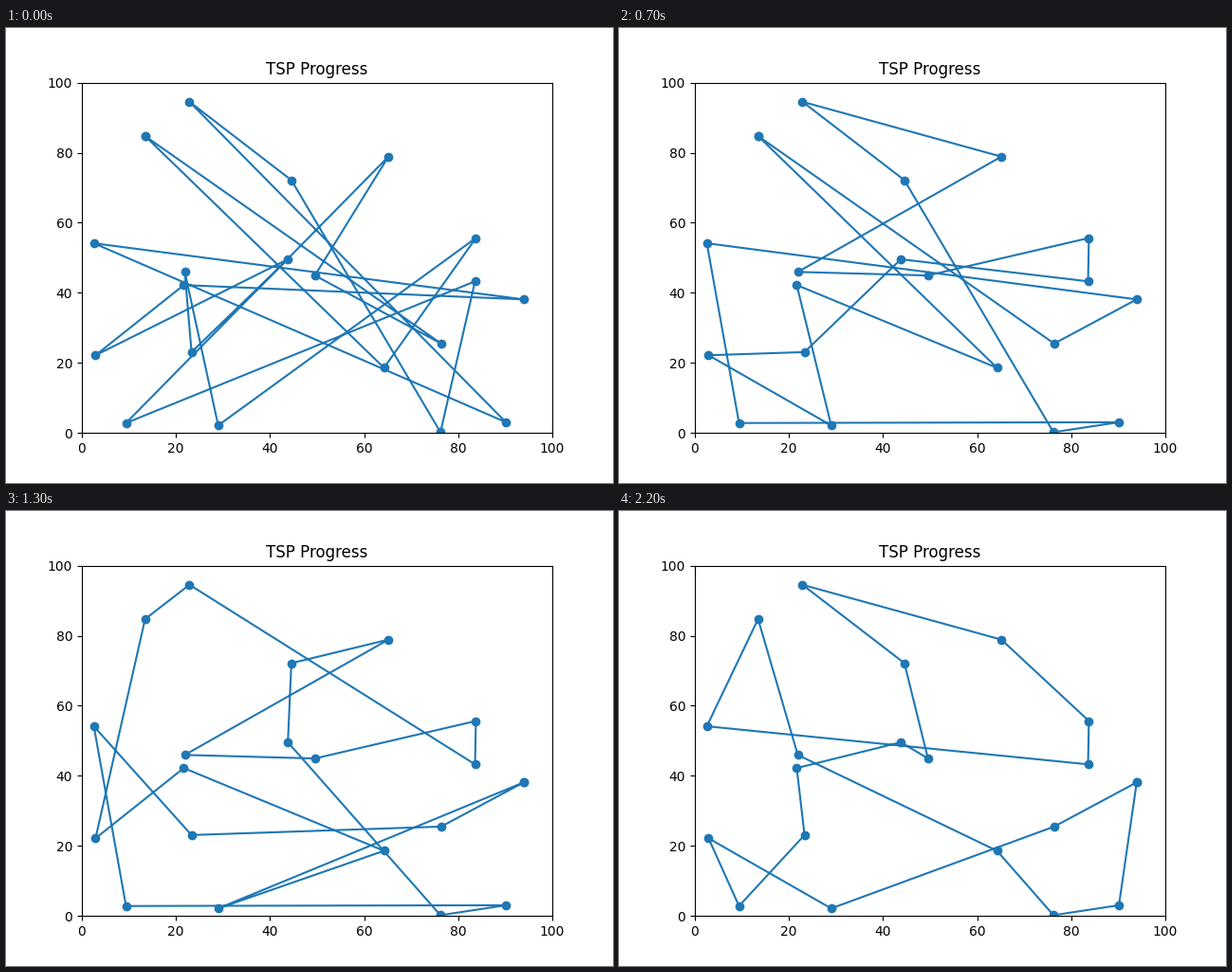
These frames come from a looping animation (640x480 px, 2300 ms). A matplotlib script:

```python
import math
import random

import matplotlib.pyplot as plt
from matplotlib.animation import FuncAnimation

CITY_COUNT = 20
FRAMES = 23
STEP_MS = 100
MAX_TRIES = 5000


def closed(tour):
    return tour + tour[:1]


def length(tour):
    return sum(math.dist(a, b) for a, b in zip(tour, closed(tour)[1:]))


def swapped(tour):
    """Copy of the tour with two random stops exchanged."""
    i, j = random.sample(range(len(tour)), 2)
    tour = tour[:]
    tour[i], tour[j] = tour[j], tour[i]
    return tour


def hill_climb(tour):
    """List every tour that improves on the one before it."""
    tours = [tour]
    for _ in range(MAX_TRIES):
        trial = swapped(tours[-1])
        if length(trial) < length(tours[-1]):
            tours.append(trial)
        if len(tours) == FRAMES:
            break
    return tours


random.seed(1)
cities = [(random.uniform(0, 100), random.uniform(0, 100))
          for _ in range(CITY_COUNT)]
tours = hill_climb(cities)

fig, ax = plt.subplots(figsize=(6.4, 4.8), dpi=100)
ax.set(xlim=(0, 100), ylim=(0, 100), title="TSP Progress")
line, = ax.plot([], [], "o-", color="#1f77b4")


def update(step):
    line.set_data(*zip(*closed(tours[step])))
    return line,


anim = FuncAnimation(fig, update, frames=len(tours),
                     interval=STEP_MS, repeat=True, repeat_delay=0)
plt.show()
```
